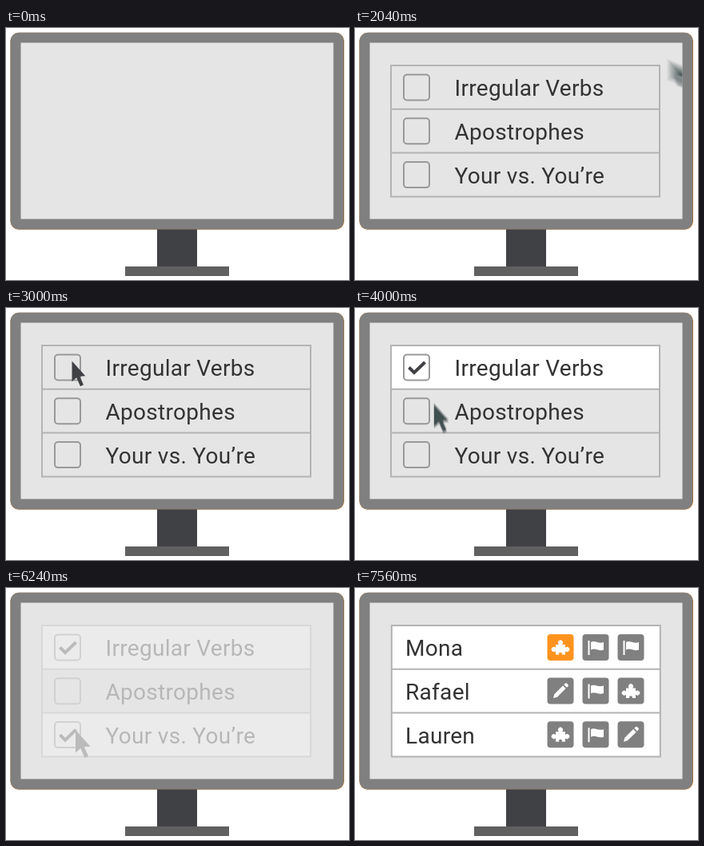
These frames come from a looping animation (429 by 316 pixels, 8 s). An HTML page:

```html
<!DOCTYPE html>
<html lang="en">
<head>
<meta charset="utf-8">
<title>Quiz topics on a monitor</title>
<style>
  html, body { margin: 0; width: 100%; height: 100%; overflow: hidden; background: #fff; }
  svg { display: block; }
  text { font: 28px Roboto, Arial, sans-serif; letter-spacing: .3px; fill: #333; }
  .line { fill: none; stroke: #b3b3b3; stroke-width: 2; }
  .box { fill: none; stroke: #999; stroke-width: 2; }
  .tick { fill: none; stroke: #404145; stroke-width: 4; }
  #cursor { isolation: isolate; }
  #cursor path { fill: #404145; mix-blend-mode: plus-lighter; }
</style>
</head>
<body>
<svg width="429" height="316" viewBox="0 0 429 316">
  <rect x="5.4" y="5.8" width="417.6" height="247" rx="10.5" fill="#b5752c"/>
  <rect x="5.6" y="5.8" width="416.8" height="246.6" rx="11" fill="#808080"/>
  <rect x="189" y="252.5" width="50" height="47" fill="#404145"/>
  <rect x="149" y="299" width="130" height="12" fill="#606060"/>
  <svg x="18.5" y="18.5" width="391" height="221" viewBox="18.5 18.5 391 221">
    <rect x="18" y="18" width="392" height="222" fill="#e5e5e5"/>
    <g id="topics"></g>
    <g id="people"></g>
  </svg>
</svg>
<script>
const LOOP = 8000, FRAME = 40, SAMPLES = 16;
const $ = id => document.getElementById(id);
const clamp = v => Math.min(1, Math.max(0, v));
const span = (t, a, b) => clamp((t - a) / (b - a));
const ROWS = [0, 1, 2];
const rowY = row => 47 + 54.8 * row;

const glyphs = {
  puzzle: 'M10.5 13h4.2a3 3 0 1 1 3.6 0h4.2v4a3 3 0 1 1 0 4v4.5h-4.2a2 2 0 1 0-3.6 0h-4.2v-4.5a3 3 0 1 1 0-4z',
  flag: 'M7 8h2v18h-2zM10.5 10c5-3 8 2.5 16 0v9.5c-7 2.5-10-3-16 0z',
  pencil: 'M7.5 25.5l1.4-5 10.6-10.6 3.6 3.6-10.6 10.6zM20.8 8.6l1.6-1.6a1.5 1.5 0 0 1 2 0l1.6 1.6a1.5 1.5 0 0 1 0 2l-1.6 1.6z'
};

const rowFill = row => `<rect x="45" y="${rowY(row)}" width="336" height="54.8" fill="#fff"/>`;
const grid = `<path class="line" d="M45 47H381V211.4H45Z M45 ${rowY(1)}H381 M45 ${rowY(2)}H381"/>`;
const label = (x, row, s) => `<text x="${x}" y="${84.5 + 55 * row}">${s}</text>`;
const icon = (name, col, row) =>
  `<g transform="translate(${240.5 + 44 * col} ${58 + 54.6 * row})">
    <rect class="tile" width="33" height="33" rx="4" fill="#808080"/><path d="${glyphs[name]}" fill="#fff"/></g>`;

$('topics').innerHTML =
  ROWS.map(r => `<g class="white">${rowFill(r)}</g>`).join('') + grid +
  ['Irregular Verbs', 'Apostrophes', 'Your vs. You’re'].map((s, r) =>
    `<rect class="box" x="61" y="${58.5 + 54.8 * r}" width="32" height="32" rx="4"/>
     <path class="tick" d="M67.5 ${74.5 + 54.8 * r}l6.5 6.5 13.5-13"/>` + label(124.5, r, s)).join('') +
  '<g id="cursor">' +
  '<path d="M0 0V28.5L6.3 23 11.6 35 16 33 10.8 21.3 18.5 20.8Z"/>'.repeat(SAMPLES) + '</g>';

const students = [
  ['Mona', 'puzzle', 'flag', 'flag'],
  ['Rafael', 'pencil', 'flag', 'puzzle'],
  ['Lauren', 'puzzle', 'flag', 'pencil']
];
$('people').innerHTML =
  `<g transform="translate(.8 0)">${ROWS.map(rowFill).join('')}${grid}</g>` +
  students.map(([name, ...icons], r) =>
    label(63, r, name) + icons.map((g, c) => icon(g, c, r)).join('')).join('');

const whites = document.querySelectorAll('.white');
const ticks = document.querySelectorAll('.tick');
const copies = document.querySelectorAll('#cursor path');
const firstTile = document.querySelector('.tile');

const arc = (s, a, b, c) => a.map((v, i) =>
  (1 - s) ** 2 * v + 2 * s * (1 - s) * b[i] + s * s * c[i]);

function cursorAt(t) {
  const home = [82.5, 66.5];
  if (t < 3000) {
    const p = span(t, 2000, 2560);
    return arc(1 - (1 - p) ** 2, [450, 66.5], [266, -37.5], home);
  }
  const p = span(t, 3800, 4240) ** .9;
  return arc(p * p * (3 - 2 * p), home, [113, 122], [87, 178]);
}

// Dips the cursor for 200 ms around a click
const press = (t, at) => .12 * clamp(1 - Math.abs(t - at) / 100);

function draw(now) {
  const t = Math.floor(now % LOOP / FRAME) * FRAME;
  $('topics').style.opacity = span(t, 1040, 1360) - span(t, 6000, 6320);
  $('people').style.opacity = span(t, 6480, 6800);

  const checked = [t >= 3040, false, t >= 4680];
  checked.forEach((on, r) => {
    whites[r].style.opacity = ticks[r].style.opacity = on ? 1 : 0;
  });

  // Spread faint copies along the path as motion blur
  const scale = 1 - press(t, 3020) - press(t, 4660);
  const from = cursorAt(t - 8), to = cursorAt(t + 8);
  const moving = Math.hypot(to[0] - from[0], to[1] - from[1]) > .3;
  copies.forEach((c, i) => {
    const [x, y] = cursorAt(moving ? t + i - (SAMPLES - 1) / 2 : t);
    c.setAttribute('transform', `translate(${x} ${y}) scale(${scale})`);
    c.style.opacity = moving ? 1 / SAMPLES : i ? 0 : 1;
  });

  firstTile.setAttribute('fill', t >= 7560 ? '#ff931e' : '#808080');
  requestAnimationFrame(draw);
}
requestAnimationFrame(draw);
</script>
</body>
</html>
```
